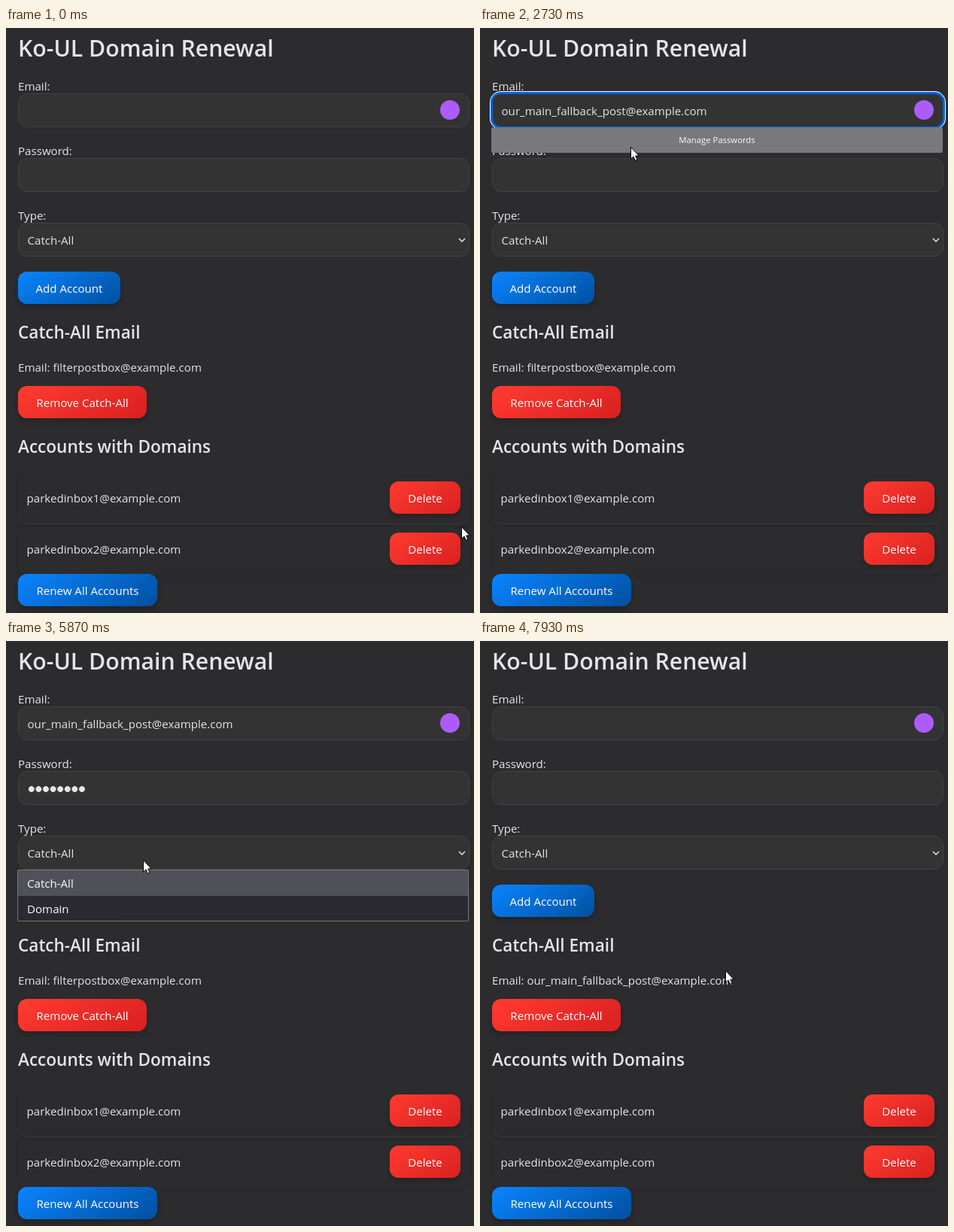
Recreate the animation shown at these times as an HTML page. Size 622 px wide and 778 px high, loop 8000 ms.

```html
<!DOCTYPE html>
<html lang="en">
<head>
<meta charset="utf-8">
<title>Domain renewal form</title>
<style>
html, body { margin: 0; width: 100%; height: 100%; overflow: hidden; background: #2c2c2e; }
body { position: relative; font: 15.1px/0 "Open Sans", "Noto Sans", sans-serif; color: #e5e5e7; white-space: pre; }
body > * { position: absolute; box-sizing: border-box; margin: 0; font-weight: 400; }
h1, h2, p { left: 16px; }
h1 { font-size: 30.2px; font-weight: 600; }
h2 { font-size: 22.6px; font-weight: 600; }
.field { left: 16px; width: 600px; height: 45px; padding-left: 11.5px; display: flex; align-items: center;
  background: #333; border: 1px solid #424244; border-radius: 12px; }
.focus { border-color: #0060df; box-shadow: 0 0 0 2px #0060df, 0 0 0 3px #fff; }
.btn { left: 16px; height: 43px; display: flex; align-items: center; justify-content: center; color: #fff;
  border-radius: 12px; background: linear-gradient(145deg, #0a84ff, #0050a0); box-shadow: 0 4px 6px #0003; }
.red { background: linear-gradient(145deg, #ff3b30, #d92020); }
.del { left: 510px; width: 94px; }
.row { left: 16px; width: 600px; padding: 34px 11.5px; border-radius: 12px; box-shadow: 0 2px 4px #0000001a; }
.logo { border-radius: 50%; background: #ac5cf8; }
.popup { left: 15px; width: 600px; border: 1px solid #77767e; border-radius: 2px; background: #2b2a33;
  color: #fbfbfe; font-size: 11.3px; overflow: hidden; }
.popup > div, .tip { display: flex; align-items: center; justify-content: center; }
.popup .mask { height: 26px; justify-content: start; padding-left: 5px; gap: 13px; }
.popup .mask i { width: 15px; height: 15px; }
.popup .manage { height: 32px; background: #65646b; }
.popup .option { height: 34px; justify-content: start; padding-left: 12px; font-size: 15.1px; }
.tip { left: 165px; top: 218px; width: 129px; height: 22px; border: 1px solid #e4e4e6; border-radius: 3px;
  background: #2b2a33; color: #fff; font-size: 11.3px; }
#dots { left: 28.7px; top: 192px; height: 10px; background: radial-gradient(circle, #e5e5e7 3.6px, #e5e5e700 4.2px) 0 0 / 9.6px 10px; }
#caret { width: 1px; height: 19px; background: #e5e5e7; }
svg { left: 0; top: 0; overflow: visible; fill: none; }
</style>
</head>
<body>
<h1 style="top:26.5px">Ko-UL Domain Renewal</h1>
<p style="top:77px">Email:</p>
<div class="field" id="email" style="top:87px"></div>
<i class="logo" style="left:577px;top:96px;width:26px;height:26px"></i>
<p style="top:163px">Password:</p>
<div class="field" id="password" style="top:173px"></div>
<div id="dots"></div>
<p style="top:249px">Type:</p>
<div class="field" style="top:259px">Catch-All</div>
<svg width="1" height="1"><path d="M602 280l4 4 4-4" stroke="#e5e5e7" stroke-width="1.5"/></svg>
<div class="btn" id="add" style="top:324px;width:136px">Add Account</div>
<h2 style="top:404.5px">Catch-All Email</h2>
<p id="current" style="top:450.5px"></p>
<div class="btn red" style="top:476px;width:171px">Remove Catch-All</div>
<h2 style="top:556.5px">Accounts with Domains</h2>
<div class="row" style="top:591px;height:68px;border-bottom:1px solid #3a3a3c">parkedinbox1@example.com</div>
<div class="btn red del" style="top:603px">Delete</div>
<div class="row" style="top:659px;height:67px">parkedinbox2@example.com</div>
<div class="btn red del" style="top:671px">Delete</div>
<div class="btn" style="top:726px;width:185px">Renew All Accounts</div>

<div class="popup" id="suggest" style="top:132px">
  <div class="mask"><i class="logo"></i>Use Bramble Cloak email mask</div><div class="manage" id="manage">Manage Passwords</div>
</div>
<div class="popup" id="options" style="top:304px;height:69px">
  <div class="option" style="background:#505058">Catch-All</div><div class="option">Domain</div>
</div>
<div class="tip" id="tip">Please fill out this field.</div>
<div id="caret"></div>
<svg id="cursor" width="1" height="1">
  <path id="arrow" d="M.5 .5V16.2L4 12.9 6.4 18.3 9 17.2 6.7 12H11.3Z" fill="#fff" stroke="#000"/>
  <path id="beam" d="M-3 -7.5H-.5M1.5 -7.5H4M.5 -7V7M-3 7.5H-.5M1.5 7.5H4" stroke="#d8d8d8"/>
</svg>
<script>
const LOOP = 8000;
const NEW_MAIL = "our_main_fallback_post@example.com";
const KEY_TIMES = [3600, 3730, 3870, 4070, 4200, 4330, 4400, 4600];
// Pointer stops: time, x, y
const PATH = [
  [70, 605, 663], [270, 520, 470], [530, 210, 190], [730, 113, 105], [1670, 113, 105],
  [1870, 199, 116], [1970, 218, 112], [2130, 199, 116], [2670, 200, 122], [2730, 200, 158],
  [2950, 166, 197], [5000, 166, 197], [5070, 166, 222], [5400, 190, 280], [5800, 190, 280],
  [6070, 160, 322], [6200, 160, 322], [6470, 148, 371], [6930, 148, 371], [7070, 125, 352],
  [7530, 125, 352], [7730, 314, 441], [7930, 326, 438]
];
const $ = id => document.getElementById(id);
const within = (t, a, b) => t >= a && t < b;
const show = (id, on) => $(id).style.visibility = on ? "visible" : "hidden";
const ramp = (t, start, ms) => Math.min(1, Math.max(0, (t - start) / ms));

function pointerAt(t) {
  const i = PATH.findIndex(p => p[0] > t);
  if (i === 0) return PATH[0].slice(1);
  if (i < 0) return PATH.at(-1).slice(1);
  const [t0, x0, y0] = PATH[i - 1], [t1, x1, y1] = PATH[i], k = (t - t0) / (t1 - t0);
  return [x0 + (x1 - x0) * k, y0 + (y1 - y0) * k].map(Math.round);
}

function placeCaret(t, typed) {
  const inEmail = within(t, 1370, 1800) || within(t, 2400, 2700);
  const inPassword = within(t, 3100, 4800);
  show("caret", inEmail || inPassword);
  $("caret").style.left = (inPassword ? 29 + Math.round(typed * 9.6) : t > 2000 ? 304 : 29) + "px";
  $("caret").style.top = inPassword ? "186px" : "100px";
}

function draw(t) {
  const typed = t < 7330 ? KEY_TIMES.filter(k => t >= k).length : 0;
  $("email").textContent = within(t, 2270, 7330) ? NEW_MAIL : "";
  $("email").classList.toggle("focus", within(t, 1330, 3070));
  $("password").classList.toggle("focus", within(t, 3070, 5530));
  $("dots").style.width = typed * 9.6 + "px";
  $("current").textContent = "Email: " + (t < 7330 ? "filterpostbox@example.com" : NEW_MAIL);
  placeCaret(t, typed);

  const narrow = t >= 2330;
  show("suggest", within(t, 1400, 3070));
  $("suggest").firstElementChild.style.display = narrow ? "none" : "";
  $("manage").style.background = narrow ? "#79787c" : "";
  $("manage").style.paddingTop = $("manage").style.marginTop = narrow ? "0" : "";
  $("suggest").style.height = narrow ? "34px" : "60px";
  show("options", within(t, 5530, 6130));
  show("tip", within(t, 3800, 5070));

  const hover = ramp(t, 6130, 200) - ramp(t, 6430, 300) + ramp(t, 7000, 200) - ramp(t, 7630, 300);
  $("add").style.transform = `translate(${hover * .5}px, ${-hover}px) scale(${1 + hover * .004})`;

  const [x, y] = pointerAt(t);
  const hidden = within(t, 2270, 2670) || within(t, 3600, 5000);
  const overText = within(y, 87, 132) || within(y, 173, 218);
  $("cursor").style.transform = `translate(${x}px, ${y}px)`;
  show("arrow", !hidden && !overText);
  show("beam", !hidden && overText);
}

function tick() {
  draw(performance.now() % LOOP);
  requestAnimationFrame(tick);
}
tick();
</script>
</body>
</html>
```
